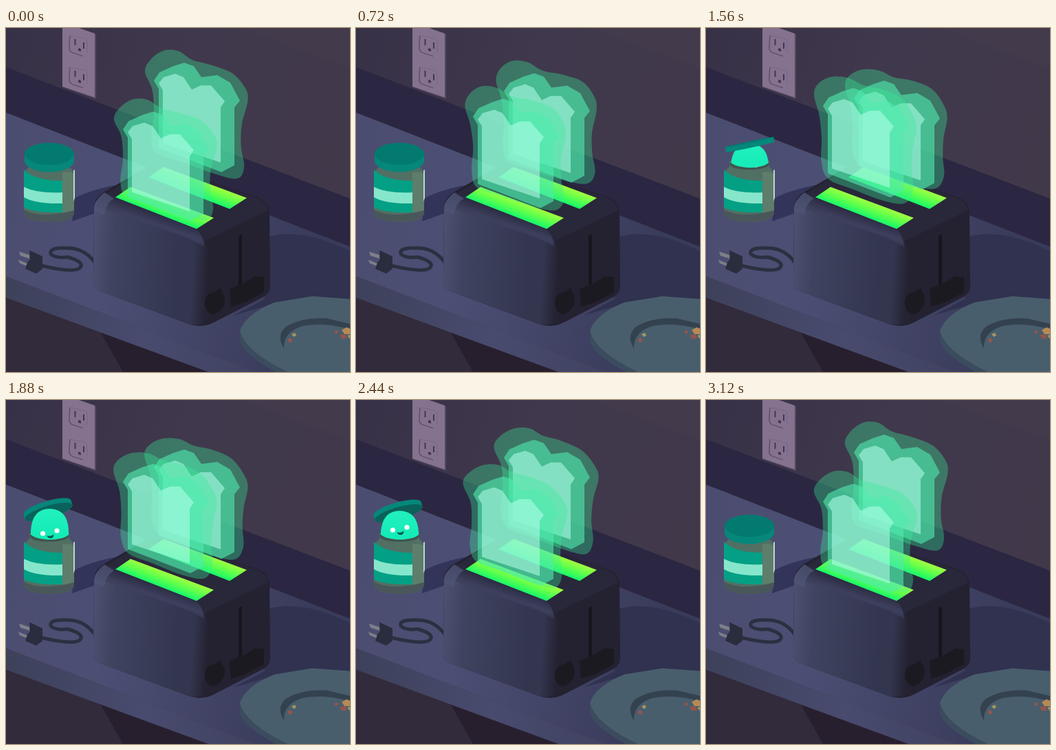
An HTML page that plays this animation: 500x500 px, repeating every 3160 ms.

```html
<!DOCTYPE html>
<html lang="en">
<head>
<meta charset="utf-8">
<title>Haunted toaster</title>
<style>
html, body { margin: 0; width: 100%; height: 100%; overflow: hidden; background: #3f384c; }
svg { display: block; width: 100vw; height: 100vh; }
.aura { fill: #37eb96; fill-opacity: .35; }
.crust { fill: #50ebaf; fill-opacity: .6; }
.face { fill: #b4ffec; fill-opacity: .55; }
</style>
</head>
<body>
<svg viewBox="0 0 500 500" preserveAspectRatio="xMidYMid slice">
<defs>
  <linearGradient id="wall" x2="1" y2=".3">
    <stop offset="0" stop-color="#373147"/><stop offset=".5" stop-color="#40384c"/><stop offset="1" stop-color="#41394a"/>
  </linearGradient>
  <linearGradient id="counter" gradientUnits="userSpaceOnUse" x1="0" y1="250" x2="440" y2="330">
    <stop offset="0" stop-color="#4b4d70"/><stop offset=".35" stop-color="#4c4f74"/><stop offset="1" stop-color="#393b5a"/>
  </linearGradient>
  <linearGradient id="edge"><stop offset="0" stop-color="#3e415a"/><stop offset=".5" stop-color="#484b6e"/><stop offset="1" stop-color="#3e405e"/></linearGradient>
  <linearGradient id="front" gradientUnits="userSpaceOnUse" x1="127" y1="320" x2="294" y2="330">
    <stop offset="0" stop-color="#4b5070"/><stop offset=".18" stop-color="#3f435f"/><stop offset=".75" stop-color="#33364f"/><stop offset=".87" stop-color="#343650"/><stop offset="1" stop-color="#252333"/>
  </linearGradient>
  <linearGradient id="shine" gradientUnits="userSpaceOnUse" x1="205" y1="263" x2="194" y2="294">
    <stop offset="0" stop-color="#2b2a41"/><stop offset=".5" stop-color="#3d405d"/><stop offset="1" stop-color="#3d405d" stop-opacity="0"/>
  </linearGradient>
  <linearGradient id="glow" gradientUnits="userSpaceOnUse" x1="220" y1="246" x2="212" y2="267">
    <stop offset="0" stop-color="#9bff42"/><stop offset=".45" stop-color="#62ff4a"/><stop offset="1" stop-color="#16f96a"/>
  </linearGradient>
  <linearGradient id="spirit" x2="0" y2="1"><stop offset="0" stop-color="#22f0bd"/><stop offset="1" stop-color="#00e6ae"/></linearGradient>
  <clipPath id="mouthOfJar"><path d="M0 100H130V194H92Q88 202 64 203Q40 202 35 194H0Z"/></clipPath>
  <g id="socket">
    <path d="M93 11Q92 20 92 29Q92 34 97 36L112 41" fill="none" stroke="#594a6b" stroke-width="1.3"/>
    <path d="M93 11L113 15Q118 17 118 22V36" fill="none" stroke="#76648a" stroke-width=".8"/>
    <path d="M100.500 16V25M113 21V30" stroke="#42374f" stroke-width="2"/>
    <path d="M105 33V30Q107 28 109 31V34Z" fill="#42374f"/>
  </g>
  <path id="slot" d="M159 246L181 231L302 276L277 292Z" fill="url(#glow)"/>
</defs>

<rect width="500" height="500" fill="url(#wall)"/>
<path d="M345 0H500V58L420 30Z" fill="#493f50" opacity=".3"/>
<path d="M0 57L500 248V318L0 123Z" fill="#2b2742"/>
<path d="M0 123L500 318V552L0 361Z" fill="url(#counter)"/>
<path d="M0 361L400 514H330L0 392Z" fill="url(#edge)"/>
<path d="M0 392L294 500H0Z" fill="#322b3b"/>
<path d="M138 443L294 500H170Z" fill="#281f2e"/>

<g id="outlet">
  <path d="M82 0H106L131 9V103L82 86Z" fill="#554762"/>
  <path d="M82 0H106L129 8V101L82 85Z" fill="#84728f"/>
  <use href="#socket"/><use href="#socket" y="46"/>
</g>

<path d="M96 281L100 247Q130 232 175 226L150 262Z" fill="#33345a"/>
<path d="M383 303Q430 290 500 324V398Q440 385 385 402L330 418L376 394Z" fill="#303250"/>

<path d="M130 342Q116 322 94 320Q62 318 65 328Q70 335 90 333Q114 340 108 348Q100 357 50 345" fill="none" stroke="#2b3041" stroke-width="5"/>
<path d="M19 325L34 330V335L21 331ZM18 337L33 343V347L20 342Z" fill="#7e8088"/>
<path d="M34 323L53 332V350L44 357L28 350L31 341L35 336Z" fill="#2a2d3d"/>

<g id="toaster">
  <path d="M128 262Q128 247 143 238L204 203Q216 197 230 201L366 246Q382 252 383 268L384 376Q384 385 374 391L302 428Q287 436 268 431L138 383Q127 379 127 369Z" fill="#242131"/>
  <path d="M136 247L205 204Q216 198 230 202L365 247Q380 254 381 265L290 309Q274 315 258 302Z" fill="#29273a"/>
  <path d="M128 262Q129 248 143 243L264 291Q292 300 293 326L294 420Q291 434 268 431L138 383Q127 379 127 369Z" fill="url(#front)"/>
  <path d="M130 262Q131 247 145 239L270 288Q286 296 288 318L266 306L148 265Z" fill="url(#shine)"/>
  <path d="M128 266Q128 250 143 239L157 248Q145 254 143 272Z" fill="#4f5474" opacity=".75"/>
  <use href="#slot"/><use href="#slot" x="48" y="-29"/>
  <path d="M338 302L343 300V374L338 376Z" fill="#17161d"/>
  <path d="M325 379L347 370L362 361L375 362V384L347 399L327 405Z" fill="#1b1a21"/>
  <path d="M289 398Q290 386 302 384L312 378L314 384Q320 389 317 402Q311 414 301 416Q289 414 289 398Z" fill="#1b1a21"/>
</g>

<g id="plate">
  <path d="M340 440Q348 416 390 399L445 390L500 394V500H392Q346 475 340 456Z" fill="#3b4c5e"/>
  <path d="M340 440Q348 416 390 399L445 390L500 394V500H410Q347 470 340 440Z" fill="#495e6d"/>
  <path d="M404 466Q392 447 407 434Q431 420 466 422L500 430V438Q464 427 432 433Q403 441 404 466Z" fill="#34424f"/>
  <g fill="#92554e"><circle cx="413" cy="454" r="3"/><circle cx="480" cy="442" r="2.5"/><path d="M485 446L493 445L496 451L488 452Z"/></g>
  <path d="M488 439L495 435L500 437V445L492 445Z" fill="#b78a55"/>
  <path d="M415 445L420 443L422 447L418 449ZM496 447L500 446V452Z" fill="#a39363"/>
</g>

<g id="jar">
  <path d="M34 193Q62 207 92 193V202Q99 207 99 218V268Q98 282 62 282Q27 281 26 268V218Q26 207 34 202Z" fill="#526f64"/>
  <ellipse cx="63" cy="198" rx="29" ry="8" fill="#40554f"/>
  <path d="M82 210Q98 207 99 215V268Q94 276 82 278Z" fill="#5f7d6b"/>
  <path d="M26 264Q50 278 99 265V269Q98 282 62 282Q27 281 26 269Z" fill="#49575a"/>
  <path d="M26 206Q42 222 82 222V268Q38 269 26 260Z" fill="#03a085"/>
  <path d="M26 231Q46 241 82 239V255Q43 256 26 246Z" fill="#86e6cb"/>
  <path d="M98 207L100 206V247L98 252Z" fill="#b9d9d0"/>
  <g id="ghost" clip-path="url(#mouthOfJar)">
    <g id="spook">
      <path d="M36 90V32Q38 0 64 0Q90 1 91 32V90Z" fill="url(#spirit)"/>
      <g id="look">
        <circle cx="53.5" cy="1" r="3.6" fill="#fff"/><circle cx="74" cy="-3" r="3.6" fill="#fff"/>
        <path d="M59.500 4Q64 6 69.500 2.500Q69 8 65 8Q60.500 8 59.500 4Z" fill="#07584f"/>
      </g>
    </g>
  </g>
  <g id="lid">
    <path id="rim" fill="#05877a"/><ellipse id="disc" rx="36"/>
  </g>
</g>

<g id="back"></g>
<g id="near"></g>
</svg>
<script>
const LOOP = 3160, STEP = 40, TAU = Math.PI * 2;
const el = id => document.getElementById(id);

const CRUST = "M170 148L178 136L198 127L214 122L228 127L239 143L262 140L281 151L295 177L287 187V271L268 281L177 246V160Z";
const FACE = "M177 152L184 143L201 138L213 143L225 161L238 155L253 155L273 178L267 187V267L183 239V162Z";
const AURA = [[157, 132], [164, 116], [183, 105], [206, 106], [227, 117], [254, 123], [284, 135],
  [302, 157], [306, 175], [299, 206], [298, 235], [301, 262], [290, 279], [258, 274], [212, 258],
  [176, 245], [167, 222], [169, 190], [166, 158]];

const slices = ["back", "near"].map(id => {
  const node = el(id);
  node.innerHTML = `<path class="aura"/><path class="crust" d="${CRUST}"/><path class="face" d="${FACE}"/>`;
  return { node, aura: node.firstChild };
});

// Closed Catmull-Rom curve through the points
function blob(pts) {
  const n = pts.length, at = i => pts[(i + n) % n];
  const ctrl = (p, q, r, s) => [p[0] + s * (r[0] - q[0]) / 6, p[1] + s * (r[1] - q[1]) / 6];
  let d = "M" + pts[0];
  for (let i = 0; i < n; i++) {
    const [a, b, c, e] = [at(i - 1), at(i), at(i + 1), at(i + 2)];
    d += "C" + [ctrl(b, a, c, 1), ctrl(c, b, e, -1), c].join(" ");
  }
  return d + "Z";
}

// Rows are [time, ...values]
function track(rows, t) {
  if (t <= rows[0][0]) return rows[0].slice(1);
  const i = rows.findIndex(r => r[0] > t);
  if (i < 0) return rows[rows.length - 1].slice(1);
  const a = rows[i - 1], b = rows[i], k = (t - a[0]) / (b[0] - a[0]);
  return a.slice(1).map((v, j) => v + (b[j + 1] - v) * k);
}

// time, centre x, centre y, angle, half height of disc
const LID = [[1200, 63, 183, 0, 16], [1560, 63, 166, -12, 1], [1760, 60, 155, -18, -11],
  [1880, 60, 156, -17, -9], [2440, 60, 158, -16, -9], [2720, 60, 158, -16, -9],
  [2920, 63, 168, -10, 2], [3080, 63, 183, 0, 16]];
// time, top of head, eye distance below it
const GHOST = [[1240, 208, 40], [1560, 168, 40], [1760, 156, 38], [1880, 158, 35],
  [2200, 160, 27], [2440, 161, 27], [2720, 161, 27], [2960, 208, 34]];

const swing = (t, peak) => (1 + Math.cos(TAU * (t - peak) / LOOP)) / 2;

// The aura trails: it is stretched downwards while the slice is high
function drawSlice(slice, x, y, t, height) {
  const a = TAU * t / LOOP;
  slice.node.setAttribute("transform", `translate(${x} ${y})`);
  slice.aura.setAttribute("d", blob(AURA.map(([px, py], i) => [
    px + 1.5 * Math.sin(a + i * 1.15),
    py + 1.2 * Math.cos(a + i * 1.15) + 11 * height * (py - 105) / 174
  ])));
}

function drawJar(t) {
  const [cx, cy, turn, h] = track(LID, t), [top, eyes] = track(GHOST, t);
  const ry = Math.abs(h), thick = 7 + Math.max(0, h) / 5;
  el("lid").setAttribute("transform", `translate(${cx} ${cy}) rotate(${turn})`);
  el("rim").setAttribute("d", `M-36 0A36 ${ry} 0 0 1 36 0V${thick}A36 ${ry} 0 0 1 -36 ${thick}Z`);
  const disc = el("disc");
  disc.setAttribute("cy", h > 0 ? 0 : thick);
  disc.setAttribute("ry", ry);
  disc.setAttribute("fill", h > 0 ? "#037a70" : "#0a625b");
  el("spook").setAttribute("transform", `translate(0 ${top})`);
  el("look").setAttribute("transform", `translate(0 ${eyes})`);
  // Once tipped over, the lid hangs behind the head
  el("jar").append(h > 0 ? el("lid") : el("ghost"));
}

const start = performance.now();
function frame(now) {
  const t = Math.floor(Math.max(0, now - start) % LOOP / STEP) * STEP;
  const drop = swing(t, 1430), rise = swing(t, 1460);
  drawSlice(slices[0], 45, -72 + 27 * drop, t, 1 - drop);
  drawSlice(slices[1], 0, -35 * rise, t, rise);
  drawJar(t);
  requestAnimationFrame(frame);
}
frame(start);
</script>
</body>
</html>
```
